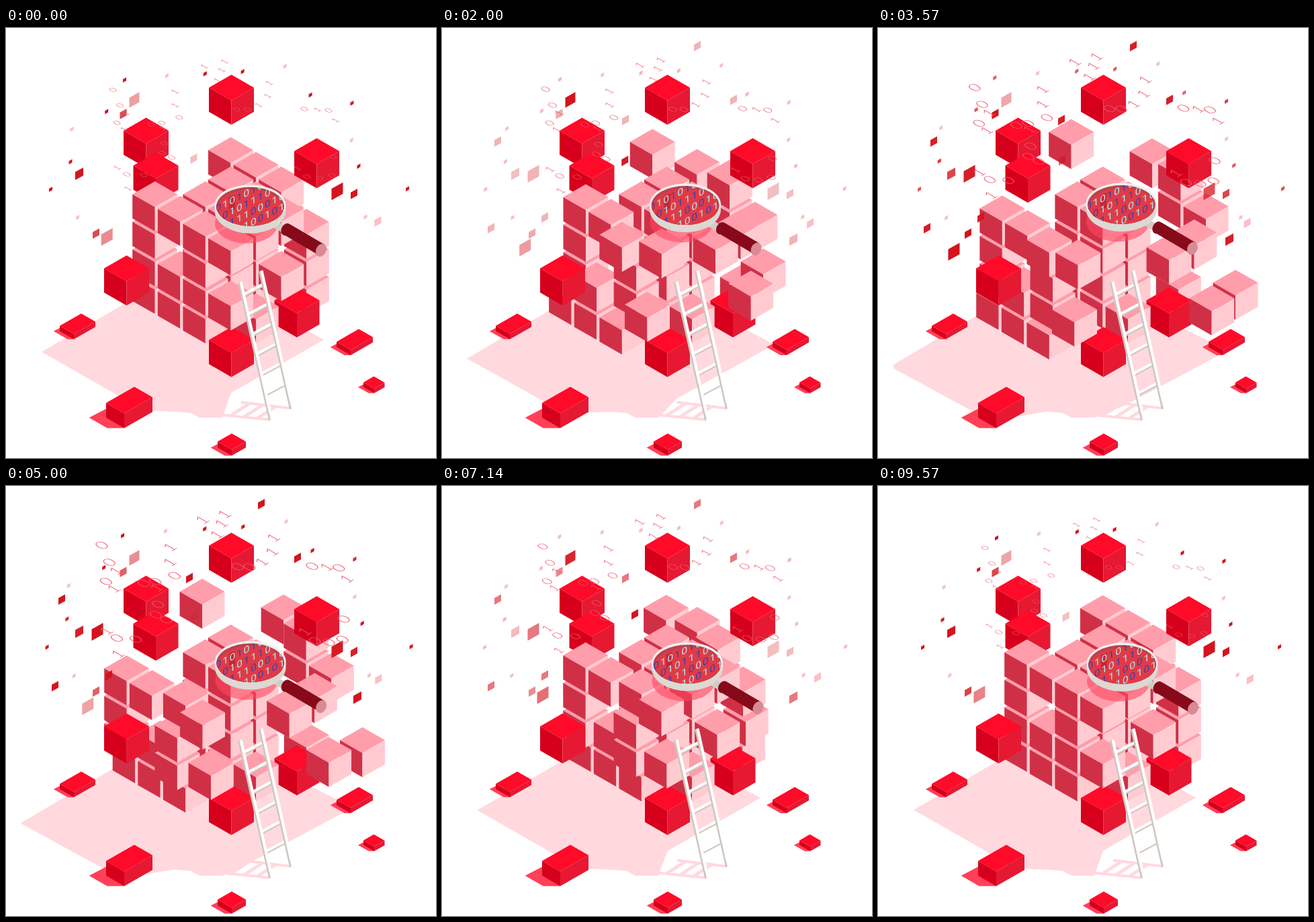
An HTML page with a canvas that plays this animation: 640 px wide and 640 px high, repeating every 9640 ms.

```html
<!DOCTYPE html>
<html lang="en">
<head>
<meta charset="utf-8">
<style>
html, body { margin: 0; width: 100%; height: 100%; overflow: hidden; background: #fff; }
canvas { display: block; }
</style>
</head>
<body>
<canvas width="640" height="640"></canvas>
<script>
const ctx = document.querySelector('canvas').getContext('2d');
const LOOP = 9640, TAU = Math.PI * 2, SLOPE = .573;
const RED = ['#ff0a28', '#d6001c', '#e61832'];
const PINK = ['#ff9dab', '#d03046', '#ffcbd1'];

const clamp = v => Math.min(1, Math.max(0, v));
const sine = v => (1 - Math.cos(Math.PI * clamp(v))) / 2;
// out, short hold, back
const burst = (t, delay) => sine((t - 500 - delay) / 3200) - sine((t - 4400 - delay) / 3000);
const breathe = t => {
  const p = 1 - Math.abs(1 - t / (LOOP / 2));
  return p < .5 ? .5 * (2 * p) ** 2.6 : 1 - .5 * (2 - 2 * p) ** 2.6;
};
const wave = (t, peak) => (1 + Math.cos(TAU * (t - peak) / LOOP)) / 2;
const random = n => {
  const v = Math.sin(n * 127.1 + 3) * 43758.5;
  return v - Math.floor(v);
};

function poly(color, ...p) {
  ctx.fillStyle = color;
  ctx.beginPath();
  for (let i = 0; i < p.length; i += 2) ctx.lineTo(p[i], p[i + 1]);
  ctx.fill();
}
function line(color, width, x1, y1, x2, y2) {
  ctx.strokeStyle = color;
  ctx.lineWidth = width;
  ctx.beginPath();
  ctx.moveTo(x1, y1);
  ctx.lineTo(x2, y2);
  ctx.stroke();
}
function oval(color, x, y, rx, ry, turn = 0) {
  ctx.fillStyle = color;
  ctx.beginPath();
  ctx.ellipse(x, y, rx, ry, turn, 0, TAU);
  ctx.fill();
}
// x, y: top corner; a, b: extents to the left and right; h: height
function box([top, left, right], x, y, a = 33.5, b = 33.5, h = 36) {
  const ly = y + a * SLOPE, ry = y + b * SLOPE, fx = x - a + b, fy = ly + b * SLOPE;
  poly(top, x, y, x + b, ry, fx, fy, x - a, ly);
  poly(left, x - a, ly, fx, fy, fx, fy + h, x - a, ly + h);
  poly(right, fx, fy, x + b, ry, x + b, ry + h, fx, fy + h);
}

// Letters give the way a cube leaves: left, right, back, away; capitals start late, s stays
const layers = [
  ['a..L', 'BssL', 'bssl', '.rrL'],
  ['...L', '.ss.', 'bssL', 'b...'],
  ['...L', '.ssl', '.ssL', 'Rr.l'],
  ['...l', '.ssl', '.ssl', 's.s.']
];
const moves = {
  l: k => ({ dx: -42, dy: 24, delay: -500 }),
  r: k => ({ dx: 61 + 13 * k, dy: 35 + 8 * k, delay: -250 }),
  b: k => ({ dx: 41, dy: -23, delay: 0 }),
  a: k => ({ dx: -47, dy: -27, delay: 0 }),
  s: k => ({ dx: 0, dy: 0, delay: 0 })
};
const cubes = [
  { x: 433, y: 386, depth: 1.5, skin: RED, ...moves.s() },
  { x: 335.5, y: 445, depth: 3, skin: RED, ...moves.s() }
];
layers.forEach((rows, k) => rows.forEach((row, i) => [...row].forEach((way, j) => {
  if (way === '.') return;
  const key = way.toLowerCase(), cube = {
    x: 334.5 + 37.6 * (i - j), y: 162.5 + 21.9 * (i + j) + 41 * k,
    depth: i + j - k, skin: PINK, ...moves[key](k)
  };
  if (way !== key) cube.delay = key === 'r' ? 200 : 600;
  cubes.push(cube);
})));
cubes.sort((a, b) => a.depth - b.depth);

// x, y, left, right, height
const slabs = [
  [112, 425, 32, 21, 8], [191, 534, 42, 27, 22], [525, 448, 33, 21, 8],
  [547.5, 518.5, 15.5, 16, 7], [336, 603.5, 21, 21, 9]
];

function floor(t) {
  const e = burst(t, 0), tint = '#ffd9de';
  ctx.save();
  ctx.beginPath();
  ctx.rect(23, 0, 617, 640);
  ctx.clip();
  poly(tint, 53 - 35 * e, 482 + 22 * e, 210, 391, 360, 400, 473 + 48 * e, 464 + 16 * e,
    335 + 32 * e, 543 + 19 * e, 322, 580, 288, 580, 275, 573, 250, 571,
    205 + 5 * e, 569 + 9 * e, 165, 546 + 38 * e);
  ctx.restore();
  line(tint, 4, 322, 576, 393, 583);
  line(tint, 4, 350, 557, 423, 566);
  for (let x = 334; x < 380; x += 20) line(tint, 5, x, 577 + (x - 334) * .1, x + 28, 559 + (x - 334) * .1);
  for (const [x, y, a, b, h] of slabs) {
    const lx = x - a, ly = y + a * SLOPE + h, fx = lx + b, fy = ly + b * SLOPE, d = h * 1.15;
    poly('#ff4058', lx, ly - h * .6, fx, fy, fx - d, fy, lx - d, ly);
    box(RED, x, y, a, b, h);
  }
}

function pile(t) {
  box(RED, 335.5, 69.5);
  box(RED, 208.5, 133.5);
  box(RED, 223, 185.5);
  for (const c of cubes) {
    const e = burst(t, c.delay);
    box(c.skin, c.x + c.dx * e, c.y + c.dy * e);
  }
  box(RED, 462.5, 164);
  box(RED, 179.5, 338.5);
}

function lens(t) {
  const dx = 3 * (wave(t, 7200) - .5), dy = -3 * (1 - wave(t, 8800));
  ctx.save();
  ctx.translate(dx, dy);
  oval('rgba(255,70,95,.6)', 358, 291, 47, 30);
  line('#d0ccc6', 11, 398, 291, 414, 300);
  line('#870a1a', 18, 418, 300, 469, 330);
  oval('#870a1a', 417, 300, 7, 9.5, .5);
  oval('#d98a94', 469, 331, 7.5, 10, .45);
  oval('#dcd8d2', 363.5, 272, 53, 34);
  oval('#f1efec', 363.5, 264.5, 53, 31);
  oval('#b9424e', 363.5, 266, 50.5, 29);
  ctx.clip();
  oval('#df3b46', 364, 269, 49, 28);
  poly('#c92536', 332, 252, 341, 248, 341, 270, 332, 274);
  ctx.font = '400 18px Roboto, sans-serif';
  ctx.textAlign = 'center';
  ctx.textBaseline = 'middle';
  ['0101010101', '1010111010', '0011100010', '1010100101'].forEach((row, r) => {
    [...row].forEach((ch, n) => {
      ctx.save();
      ctx.transform(.87, -.48, .02, .78, 363 + dx + (n - 4.5) * 10.5, 244 + r * 16 - (n - 4.5) * 5.4);
      ctx.fillStyle = (n * 7 + r * 3) % 5 < 2 ? '#3a3fb8' : '#b0e9ee';
      ctx.fillText(ch, 0, 0);
      ctx.restore();
    });
  });
  ctx.restore();
}

function ladder() {
  const grey = '#cdc8c0', white = '#fff';
  for (let n = 0; n < 6; n++) {
    const x = 353 + n * 6.9, y = 399 + n * 29.3;
    line(grey, 3, x, y + 1, x + 28, y - 14);
    line(white, 4, x, y - 2, x + 28, y - 17);
  }
  for (const [x, y] of [[346.5, 378.5], [377.5, 362]]) {
    line(grey, 3, x, y, x + 46, y + 205);
    line(white, 4, x + 3, y - 1, x + 47, y + 195);
  }
}

function chip(x, y, size, alpha, color = '#d4141e') {
  const w = size / 2, s = w * .56;
  ctx.globalAlpha = clamp(alpha);
  poly(color, x - w, y - w + s, x + w, y - w - s, x + w, y + w - s, x - w, y + w + s);
  ctx.globalAlpha = 1;
}

// x, y, size, blink phase
const blinkers = [
  [191, 107, 15, .36], [174.5, 128, 10, .8], [134, 306, 10, .8], [493, 243, 17, .95],
  [109, 217, 12, .93], [518, 247, 10, .93]
];
// shown only while the pile is open
const faders = [
  [136, 217, 17], [153, 282, 10], [273, 137, 10], [83, 169, 10], [73, 298, 10],
  [380, 27, 10], [434, 107, 10], [523, 315, 12]
];

function sparks(t) {
  const e = breathe(t), w = wave(t, 7200), v = wave(t, 8400);
  const blink = p => .65 + .38 * Math.cos(TAU * (t / (LOOP / 2) - p));
  for (const [x, y, s, p] of blinkers) chip(x, y, s, blink(p));
  for (const [x, y, s] of faders) chip(x, y, s, e * 1.05);
  chip(548 + 11 * w, 291 - 6 * w, 10, .27, '#ff0a28');
  chip(272 + 15 * w, 198 - 7 * w, 10, blink(.5));
  chip(113 + 44 * v, 333 - 26 * v, 17, blink(.72) * 1.2 - .2);
  // small squares on an arch around the pile
  for (let n = 0; n < 16; n++) {
    const a = Math.PI * (.95 + n / 15 * 1.1), r = .75 + .25 * random(n) + .02 * e;
    chip(324 + 275 * r * Math.cos(a), 255 + 215 * r * Math.sin(a), 5,
      n % 3 ? blink(.9 + .1 * random(n + 50)) : .25);
  }
}

// Digits gather around the floating cubes and spread outwards while growing
const clusters = [[337, 82], [203, 126], [212, 196], [470, 170]];
function digits(t) {
  const e = breathe(t), grow = 1 + .1 * e, size = .58 + .42 * e;
  ctx.fillStyle = '#ec5a6e';
  ctx.textAlign = 'center';
  ctx.textBaseline = 'middle';
  ctx.font = '300 23px Lato, sans-serif';
  for (let n = 0; n < 36; n++) {
    const [cx, cy] = clusters[n % 4], a = n * 2.4, r = 20 + 38 * random(n + 9);
    const x = cx + r * Math.cos(a), y = cy + r * Math.sin(a);
    ctx.save();
    ctx.translate(324 + (x - 324) * grow, 129 + (y - 129) * grow);
    ctx.scale(size, size);
    ctx.transform(.866, -.5, .866, .5, 0, 0);
    ctx.fillText(random(n + 80) < .5 ? '0' : '1', 0, 0);
    ctx.restore();
  }
}

function draw() {
  const t = performance.now() % LOOP;
  ctx.fillStyle = '#fff';
  ctx.fillRect(0, 0, 640, 640);
  floor(t);
  pile(t);
  lens(t);
  ladder();
  sparks(t);
  digits(t);
  requestAnimationFrame(draw);
}
draw();
</script>
</body>
</html>
```
